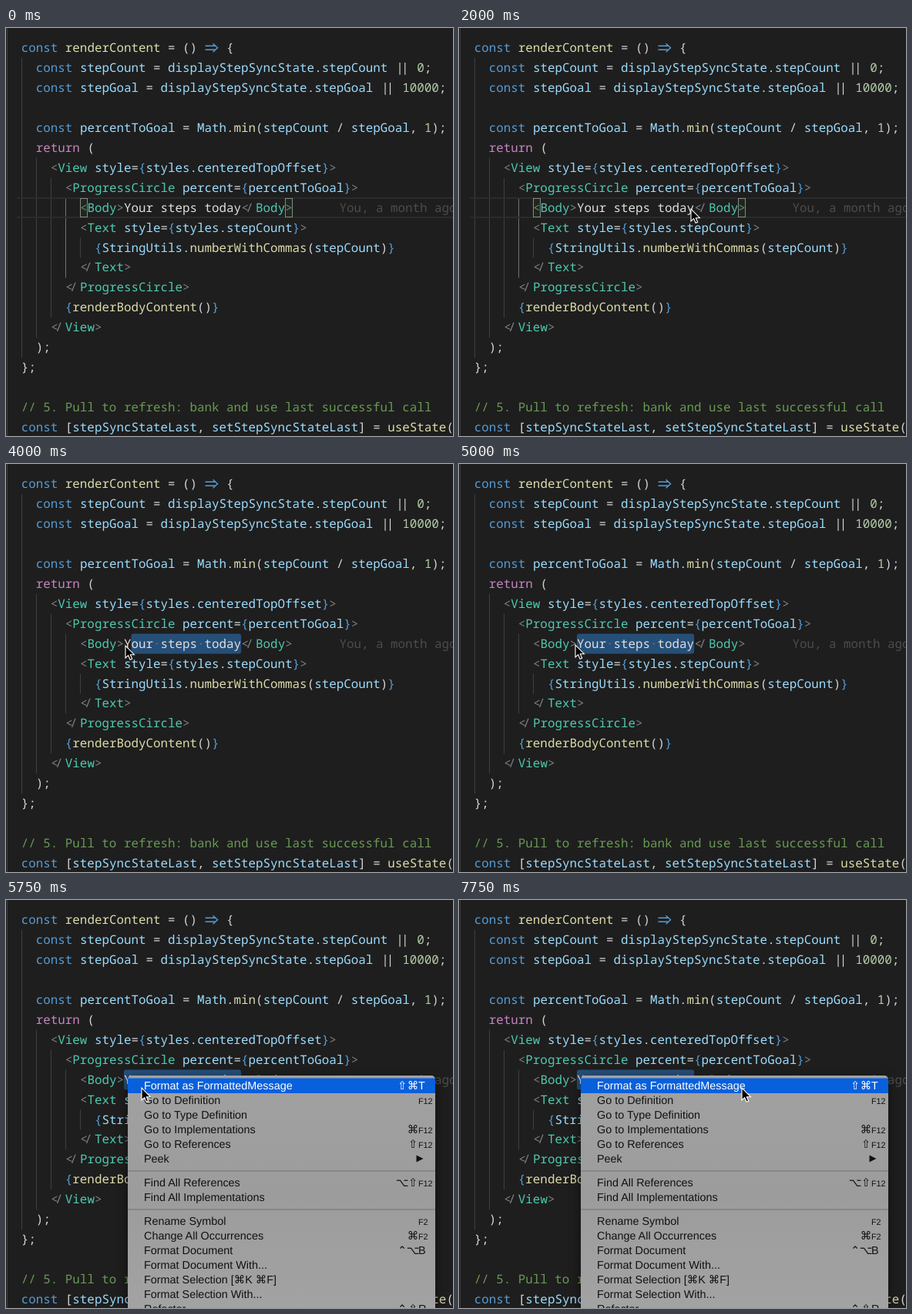
Write an HTML page that moves like this. It is 580 px wide and 530 px high and loops after 8000 ms.

```html
<!DOCTYPE html>
<html>
<head>
<meta charset="utf-8">
<style>
  html, body { margin: 0; width: 100%; height: 100%; overflow: hidden; background: #1e1e1e; }
  svg { display: block; }
  text { white-space: pre; text-rendering: geometricPrecision; }
  #code text { font: 15.85px "Noto Sans Mono", monospace; }
  #menu text { font: 14.4px "Liberation Sans", Arial, sans-serif; }
  #menu .sym { font: 14.5px "DejaVu Sans", sans-serif; text-anchor: middle; }
  #menu .fn { font-size: 10.8px; }
  #menu rect { filter: none; }
  #panel { filter: drop-shadow(0 4px 7px rgba(0, 0, 0, .5)); }
</style>
</head>
<body>
<svg width="580" height="530" viewBox="0 0 580 530">
  <defs>
    <linearGradient id="grey" x2="0" y2="1">
      <stop stop-color="#a1a1a1"/><stop offset=".5" stop-color="#9c9c9c"/><stop offset="1" stop-color="#a3a3a3"/>
    </linearGradient>
  </defs>
  <g id="guides"></g>
  <g id="current" fill="none">
    <path d="M14 221H580M14 246H580" stroke="#2b2b2b" stroke-width="2"/>
  </g>
  <g id="brackets" fill="#1c281c" stroke="#888">
    <rect x="96.5" y="221.5" width="9" height="24"/><rect x="362.5" y="221.5" width="9" height="24"/>
  </g>
  <rect id="selection" y="220.5" height="26" rx="3" fill="#264f78"/>
  <g id="code"></g>
  <g id="dots" fill="#587a9c"></g>
  <rect id="caret" y="220.5" width="2" height="26" fill="#d0d0ce"/>
  <g id="menu">
    <g id="panel"><path d="M158 540V233a5 5 0 0 1 5-5H552a5 5 0 0 1 5 5V540Z" fill="url(#grey)"/></g>
    <path d="M158 352H557M158 402H557" stroke="#878787" stroke-width="2"/>
    <rect id="highlight" x="158" y="231.5" width="399" height="19.5" fill="#0860dc"/>
    <path d="M532.5 331.5L541.5 336L532.5 340.5Z" fill="#111"/>
  </g>
  <path id="pointer" d="M0 0V16L3.6 12.7L6.1 18.3L8.7 17.2L6.3 11.7H11.4Z" fill="#000" stroke="#fff" stroke-width="1.1"/>
</svg>
<script>
const $ = id => document.getElementById(id);
const X0 = 19.8, CELL = 9.51, LINE = 25.95, TOP = 13;
const colX = col => X0 + col * CELL;
const lineY = row => TOP + row * LINE;

function add(parent, tag, attrs, content = '') {
  const el = document.createElementNS('http://www.w3.org/2000/svg', tag);
  for (const k in attrs) el.setAttribute(k, attrs[k]);
  el.textContent = content;
  return $(parent).appendChild(el);
}

const source = `const renderContent = () => {
  const stepCount = displayStepSyncState.stepCount || 0;
  const stepGoal = displayStepSyncState.stepGoal || 10000;

  const percentToGoal = Math.min(stepCount / stepGoal, 1);
  return (
    <View style={styles.centeredTopOffset}>
      <ProgressCircle percent={percentToGoal}>
        <Body>Your steps today</Body>
        <Text style={styles.stepCount}>
          {StringUtils.numberWithCommas(stepCount)}
        </Text>
      </ProgressCircle>
      {renderBodyContent()}
    </View>
  );
};

// 5. Pull to refresh: bank and use last successful call
const [stepSyncStateLast, setStepSyncStateLast] = useState(`;

// Syntax rules, first match wins
const rules = [
  [/\/\/.*/, '#6a9955'],
  [/Your steps today/, '#e0e0e0'],
  [/const\b|=>/, '#569cd6'],
  [/return\b/, '#c586c0'],
  [/(?<=<\/?)\w+/, '#4ec9b0'],
  [/<\/|[<>]/, '#808080'],
  [/\{(?=\w)|\}(?=>|$)/, '#569cd6'],
  [/\w+(?=\(| = \()/, '#dcdcaa'],
  [/\d+/, '#b5cea8'],
  [/\w+/, '#9cdcfe'],
  [/\|\||[^\s\w]/, '#d4d4d4']
];
const lexer = new RegExp(rules.map(r => `(${r[0].source})`).join('|'), 'g');

function put(str, col, row, fill) {
  add('code', 'text', { x: colX(col), y: lineY(row) + 18, fill }, str);
}

source.split('\n').forEach((line, row) => {
  for (const m of line.matchAll(lexer)) {
    const fill = rules[m.slice(1).findIndex(g => g !== undefined)][1];
    const str = m[0], col = m.index;
    if (str === '=>') {
      const x = colX(col), y = lineY(row) + 12.8;
      add('code', 'path', {
        d: `M${x + 1} ${y - 2.5}h13.5M${x + 1} ${y + 2.5}h13.5M${x + 11} ${y - 5.5}l6 5.5l-6 5.5`,
        fill: 'none', stroke: fill, 'stroke-width': 1.4
      });
    } else if (str === '</') {
      put('<', col + .05, row, fill);
      put('/', col + .65, row, fill);
    } else if (str === '||') {
      put('|', col + .15, row, fill);
      put('|', col + .85, row, fill);
    } else put(str, col, row, fill);
  }
});
add('code', 'text', { x: 432.5, y: lineY(8) + 18, fill: '#4c4c4c' }, 'You, a month ago');

// Indent guides: column, first line, end line
const guides = [[-2, -1, 20], [0, 1, 16], [2, 6, 15], [4, 7, 14], [6, 8, 12], [8, 10, 11]].map(([col, a, b]) =>
  add('guides', 'rect', { x: Math.round(colX(col)), y: lineY(a), width: 1, height: (b - a) * LINE, fill: '#404040' }));

const dots = [18, 24].map(col => add('dots', 'circle', { cx: colX(col + .5), cy: 233.5, r: 1.1 }));

// Menu rows: centre, label, modifier symbols, key
const rows = [
  [241, 'Format as FormattedMessage', '⇧⌘', 'T'],
  [260, 'Go to Definition', '', 'F12'],
  [279, 'Go to Type Definition'],
  [298, 'Go to Implementations', '⌘', 'F12'],
  [317, 'Go to References', '⇧', 'F12'],
  [336, 'Peek'],
  [367, 'Find All References', '⌥⇧', 'F12'],
  [386, 'Find All Implementations'],
  [417, 'Rename Symbol', '', 'F2'],
  [436, 'Change All Occurrences', '⌘', 'F2'],
  [455, 'Format Document', '⌃⌥', 'B'],
  [474, 'Format Document With...'],
  [493, 'Format Selection [⌘K ⌘F]'],
  [512, 'Format Selection With...'],
  [531, 'Refactor...', '⌃⇧', 'R']
];
const items = rows.map(([y, label, mods = '', key = '']) => {
  y += 5;
  const parts = [add('menu', 'text', { x: 179, y }, label)];
  [...mods].reverse().forEach((s, i) => parts.push(add('menu', 'text', { x: 528 - 14 * i, y, class: 'sym' }, s)));
  parts.push(add('menu', 'text', { x: 535, y, class: key.length > 1 ? 'fn' : '' }, key));
  return parts;
});
items.flat().forEach(el => el.setAttribute('fill', '#111'));

// Time, pointer x, pointer y, selection column
const keys = [
  [0, -50, -50, 37], [500, 424, 134, 37], [750, 392, 166, 37], [1000, 340, 210, 37],
  [1250, 296, 237, 37], [1500, 284, 238, 37], [1750, 294, 237, 37], [2000, 301, 235, 37],
  [2250, 301, 235, 30], [2500, 248, 238, 24], [2750, 174, 239, 16], [3000, 156, 237, 15],
  [3250, 154, 238, 15], [3500, 155, 236, 15], [4500, 151, 235, 14], [5750, 176, 244, 14],
  [6250, 200, 248, 14], [6500, 222, 250, 14], [6750, 245, 249, 14], [7000, 281, 251, 14],
  [7250, 320, 250, 14], [7500, 355, 246, 14], [7750, 367, 244, 14]
];
const show = (el, on) => el.setAttribute('visibility', on ? 'visible' : 'hidden');

function draw(t) {
  const [, x, y, col] = keys.findLast(k => k[0] <= t);
  $('pointer').setAttribute('transform', `translate(${x} ${y})`);

  const selected = col < 30, left = colX(col);
  $('selection').setAttribute('x', left);
  $('selection').setAttribute('width', selected ? colX(30) - left : 0);
  dots.forEach((d, i) => show(d, selected && col <= [18, 24][i]));
  show($('current'), !selected);
  show($('brackets'), col === 37);
  guides[4].setAttribute('fill', selected ? '#404040' : '#707070');

  // The blink restarts whenever the caret moves or the menu opens
  const restart = t < 2250 ? 500 : t < 3500 ? t : t < 5250 ? 3500 : 5250;
  $('caret').setAttribute('x', left + .8);
  show($('caret'), Math.floor((t - restart) / 500) % 2 === 0);

  const hover = t >= 5750;
  $('menu').style.display = t >= 5250 ? '' : 'none';
  show($('highlight'), hover);
  items[0].forEach(el => el.setAttribute('fill', hover ? '#fff' : '#111'));
}

function tick(now) {
  draw(now % 8000);
  requestAnimationFrame(tick);
}
draw(0);
requestAnimationFrame(tick);
</script>
</body>
</html>
```
